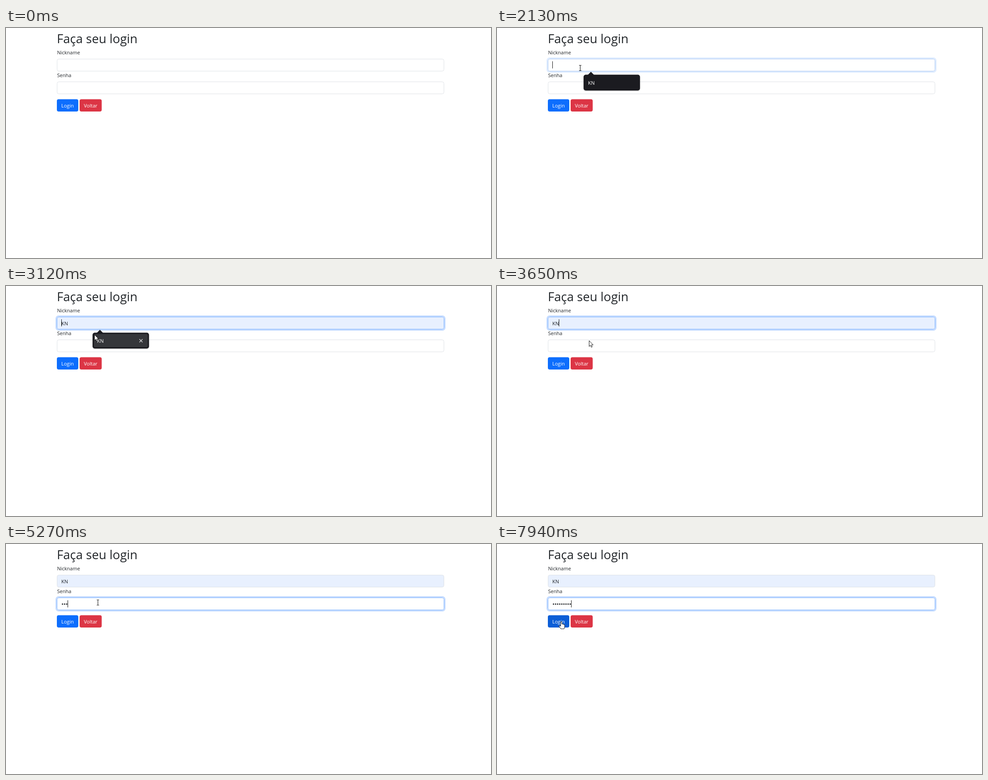
These frames come from a looping animation (1087x515 px, 8 s). An HTML page:

```html
<!DOCTYPE html>
<html lang="pt">
<head>
<meta charset="utf-8">
<style>
  html, body { margin: 0; width: 100%; height: 100%; overflow: hidden; background: #fff; }
  svg { display: block; }
  text { font: 11px "Open Sans", "Noto Sans", sans-serif; fill: #212529; }
  .title { font-size: 27.6px; font-weight: 500; }
  .white { fill: #fff; }
  .semi { font-weight: 500; }
  .field { stroke: #dee2e6; fill: #fff; }
  .glow { fill: none; stroke: #0d6efd; stroke-width: 3; }
  #arrow, #hand { fill: #fff; stroke: #000; stroke-width: .9; stroke-linejoin: round; }
  #beam { fill: none; stroke: #000; }
</style>
</head>
<body>
<svg width="1087" height="515" viewBox="0 0 1087 515">
  <text class="title" x="114" y="34">Faça seu login</text>
  <text x="114.5" y="58.5">Nickname</text>
  <text x="114.5" y="110">Senha</text>

  <rect class="glow" x="112.5" y="67.5" width="871" height="31" rx="5.5"/>
  <rect class="field" x="114.5" y="69.5" width="867" height="27" rx="4"/>
  <rect class="glow" x="112.5" y="118.5" width="871" height="31" rx="5.5"/>
  <rect class="field" x="114.5" y="120.5" width="867" height="27" rx="4"/>
  <text id="nick" x="124" y="87.5">KN</text>
  <g id="dots"></g>
  <rect id="caret" width="1" height="16" fill="#111"/>

  <rect id="login" x="114" y="159.5" width="48" height="27.5" rx="4"/>
  <text class="white" x="124" y="177.5">Login</text>
  <rect id="back" x="165" y="159.5" width="49.5" height="27.5" rx="4"/>
  <text class="white" x="174.5" y="177.5">Voltar</text>

  <g id="popup">
    <rect x="193.5" y="105" width="127.5" height="37" rx="6" fill="#000" opacity=".12"/>
    <path d="M203 105.5L210.5 98L218 105.5Z" fill="#1b1b20"/>
    <rect x="194" y="104.5" width="126.5" height="35.5" rx="5" fill="#1b1b20"/>
    <g id="active">
      <rect x="197" y="107.5" width="120.5" height="29.5" rx="3" fill="#35363a"/>
      <path d="M299 119l7 7m0-7l-7 7" stroke="#e3e3e6" stroke-width="1.2"/>
    </g>
    <text class="white semi" x="204" y="126.5">KN</text>
  </g>

  <path id="arrow" d="M.5 .5V13.4L3.4 10.7L5.3 15.2L7.5 14.3L5.6 9.9H9.5Z"/>
  <path id="beam" d="M-2.5 -6H-.5L0 -5.5L.5 -6H2.5M0 -5.5V5.5M-2.5 6H-.5L0 5.5L.5 6H2.5"/>
  <path id="hand" d="M-1.3 1.2Q0 -.6 1.3 1.2V6.2Q2.8 5.3 3.7 6.7Q5.2 6 6 7.4Q7.5 7 7.7 8.8V12.5L6.4 17H-1L-5 11Q-5.3 9.2 -3.5 9.4L-1.3 11.2Z"/>
</svg>
<script>
const LOOP = 8000;
const $ = id => document.getElementById(id);
const fields = document.querySelectorAll('.field');
const glows = document.querySelectorAll('.glow');
const show = (el, on) => el.style.display = on ? '' : 'none';
const within = (t, a, b) => t >= a && t < b;
const inBox = ([x, y], l, t, r, b) => x >= l && x <= r && y >= t && y <= b;

// pointer moves: start, last step, step count, destination
const moves = [
  [210, 960, 12, 393, 302],
  [1030, 1570, 9, 186.5, 89.5],
  [2910, 2980, 2, 197, 107],
  [3120, 3390, 5, 206, 122],
  [3720, 3850, 3, 206, 131],
  [7400, 7640, 4, 176, 162],
  [7710, 7940, 4, 144, 173]
];
const keys = [4870, 5070, 5270, 5600, 5730, 6070, 6260, 6590, 6920];
const DOT = 4.68;

keys.forEach((_, i) => $('dots').innerHTML +=
  `<circle cx="${126.6 + DOT * i}" cy="134.5" r="1.55" fill="#212529"/>`);

function pointer(t) {
  let x = 1025, y = 515;
  for (const [from, to, n, endX, endY] of moves) {
    if (t < from) break;
    const step = Math.min(n, 1 + Math.floor((t - from) / (to - from) * (n - 1)));
    const p = step / n, e = p * p * (3 - 2 * p);
    x += (endX - x) * e;
    y += (endY - y) * e;
  }
  return [x, y];
}

// three-step focus transition
const focus = (t, at) => t < at ? 0 : t < at + 80 ? .12 : t < at + 145 ? .55 : 1;

function drawField(i, amount, filled) {
  const mix = (a, b) => Math.round(a + (b - a) * amount);
  fields[i].style.stroke = `rgb(${mix(222, 134)},${mix(226, 183)},${mix(230, 254)})`;
  fields[i].style.fill = filled ? '#e8f0fe' : '#fff';
  glows[i].style.opacity = .25 * amount;
}

function drawPointer(t, pos) {
  const onLogin = inBox(pos, 114, 160, 162, 187);
  const onBack = inBox(pos, 165, 160, 214, 187);
  const onField = inBox(pos, 114, 69, 982, 97) || inBox(pos, 114, 120, 982, 148);
  const kind = onLogin || onBack ? 'hand'
    : onField && !within(t, 2980, 3780) ? 'beam' : 'arrow';
  for (const id of ['arrow', 'beam', 'hand']) {
    show($(id), id === kind && t >= 210);
    $(id).setAttribute('transform', `translate(${pos})`);
  }
  $('login').style.fill = onLogin ? '#0b5ed7' : '#0d6efd';
  $('back').style.fill = onBack ? '#bb2d3b' : '#dc3545';
}

function draw(t) {
  const filled = t >= 3120, second = t >= 3980;
  const swap = focus(t, 3980);
  drawField(0, focus(t, 2040) - swap, filled);
  drawField(1, swap, false);
  show($('nick'), filled);
  show($('popup'), within(t, 2100, 3450));
  show($('active'), filled);

  const typed = keys.filter(k => t >= k).length;
  [...$('dots').children].forEach((dot, i) => show(dot, i < typed));

  show($('caret'), within(t, 2040, 2580) || within(t, 3120, 4540) ||
    within(t, 4870, 7450) || t >= 7930);
  $('caret').setAttribute('x', second ? 124 + DOT * typed : t < 3450 ? 124 : 138.5);
  $('caret').setAttribute('y', second ? 126 : 74.5);
  drawPointer(t, pointer(t));
}

const start = performance.now();
function tick() {
  draw((performance.now() - start) % LOOP);
  requestAnimationFrame(tick);
}
tick();
</script>
</body>
</html>
```
